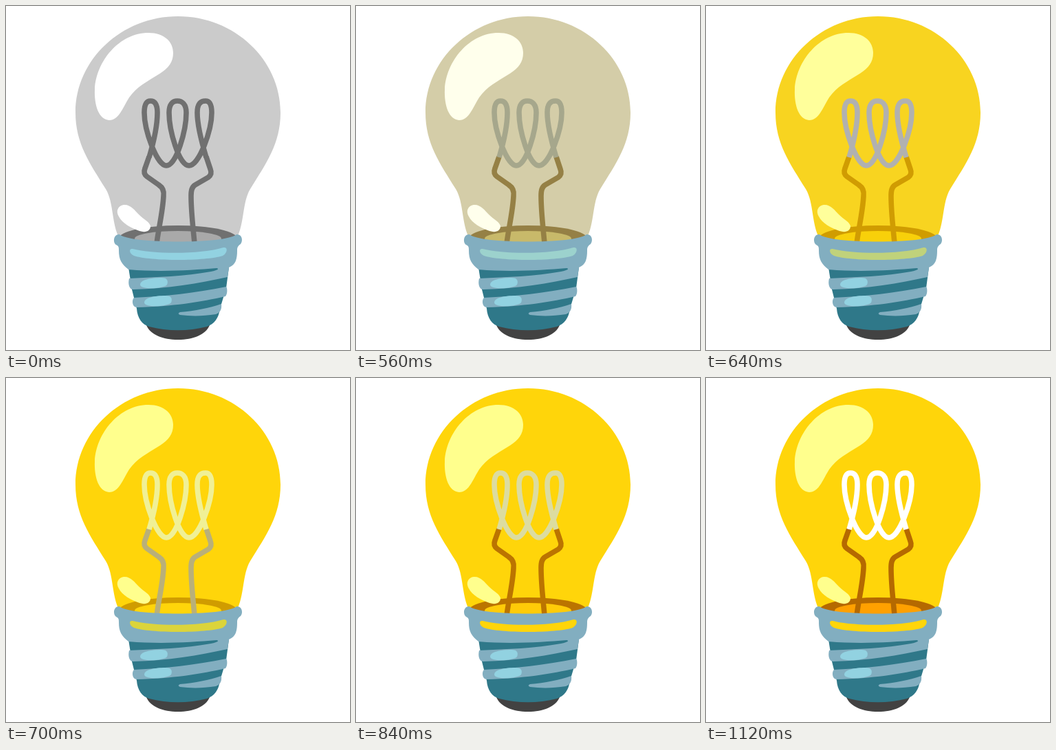
An HTML page for the animation above (2.88 s loop, 500 px wide and 500 px high).

```html
<!DOCTYPE html>
<html lang="en">
<head>
<meta charset="utf-8">
<title>Light bulb</title>
<style>
  html, body { margin: 0; width: 100%; height: 100%; overflow: hidden; background: #fff; }
  svg { display: block; width: 100%; height: 100%; }
  .wire { fill: none; stroke-width: 7.6; stroke-linejoin: round; }
</style>
</head>
<body>
<svg viewBox="0 0 500 500">
  <path id="glass" d="M250 15C168 15 101 78 101 155C101 200 122 229 145 266C157 286 153 316 165 338H335C347 316 343 286 355 266C378 229 399 200 399 155C399 78 332 15 250 15Z"/>
  <ellipse id="ring" cx="250" cy="338" rx="86" ry="19"/>
  <ellipse id="floor" cx="250" cy="338" rx="63" ry="11"/>
  <g id="stems" class="wire">
    <path d="M208 219L202 236C200 241 201 245 205 248L222 260C228 264 230 269 229 276C228 298 222 322 219 345"/>
    <path d="M291 219L297 237C299 242 298 246 294 249L275 260C270 263 269 268 269 276C269 300 272 322 274 345"/>
  </g>
  <path id="coil" class="wire" d="M208 220C214 200 220 175 220 155C220 143 216 138 210 138C204 138 201 144 201 155C201 180 219 232 233 232C248 232 262 180 262 155C262 143 256 138 249 138C242 138 237 143 237 155C237 180 251 232 266 232C281 232 299 180 299 155C299 143 296 138 290 138C282 138 278 143 278 155C278 175 285 200 291 220"/>
  <g id="shine">
    <path d="M150 166C135 165 128 145 129 121C131 80 165 39 207 39C230 39 243 52 243 68C243 82 236 90 224 98C205 110 190 117 179 133C169 149 164 166 150 166Z"/>
    <path d="M171 289C163 290 159 298 164 306C168 315 182 323 194 327C203 330 210 327 210 320C209 314 201 311 193 303C187 297 181 288 171 289Z"/>
  </g>
  <path fill="#424242" d="M204 464C210 478 228 485 250 485S290 478 296 464Z"/>
  <path fill="#2f7889" d="M178 380L183 412L187 428L190 440C191 454 198 463 208 466C235 473 265 473 292 466C303 462 309 454 311 440L320 410L324 380Z"/>
  <g fill="#82aec0">
    <path d="M165 332C156 331 155 344 160 347C164 349 164 351 164 355C164 369 168 375 178 383C225 387 270 384 306 381C312 382 304 385 298 386C260 393 220 394 179 396C177 404 179 412 185 412C235 411 280 403 322 394L324 380C334 376 336 368 336 355C336 350 338 348 341 346C345 341 343 331 335 332C320 346 180 346 165 332Z"/>
    <path d="M186 424C182 428 184 438 190 438C240 437 285 430 319 422C322 419 322 410 320 408C275 417 232 422 186 424Z"/>
    <path d="M253 445C275 443 295 439 313 433C314 441 311 446 305 448C286 451 269 451 253 449C250 448 250 446 253 445Z"/>
  </g>
  <path id="glint" d="M184 353C215 361 285 361 316 351C323 350 322 359 315 363C290 371 210 371 186 363C179 360 178 352 184 353Z"/>
  <g fill="#92d2e1">
    <path d="M195 405C195 398 210 395 226 395C235 395 236 400 234 405C230 411 195 413 195 405Z"/>
    <path d="M201 431C201 424 216 421 232 421C241 421 242 426 240 431C236 437 201 439 201 431Z"/>
  </g>
</svg>
<script>
const LOOP = 2880;

// Each track lists [time in ms, colour]
const tracks = {
  glass: [[540, 'cbcbcb'], [600, 'e4d066'], [640, 'f8d421'], [670, 'ffd50a']],
  shine: [[540, 'ffffff'], [600, 'ffffc8'], [640, 'ffff9b'], [670, 'ffff8d']],
  ring: [[520, '707070'], [600, 'b8901c'], [640, 'd09c00'], [700, 'd09c00'], [840, 'bb7400'], [1120, 'b56900']],
  floor: [[520, 'a9a9a9'], [600, 'e5c92f'], [640, 'f8d00a'], [700, 'ffd50a'], [840, 'ffcb08'], [1120, 'ffa000']],
  stems: [[520, '707070'], [600, 'b8901c'], [640, 'd09c00'], [700, 'b9b07a'], [840, 'bb7400'], [1120, 'b56900']],
  coil: [[520, '707070'], [600, 'd9dba6'], [640, 'b0b0b0'], [700, 'f0f096'], [840, 'dcdca0'], [1120, 'ffffff']],
  glint: [[530, '92d2e1'], [600, 'a8d1b3'], [640, 'c0d27c'], [700, 'dbd43c'], [780, 'ffd50a']]
};

const rgb = hex => [0, 2, 4].map(i => parseInt(hex.slice(i, i + 2), 16));

function colourAt(track, t) {
  const next = track.findIndex(([time]) => time > t);
  if (next === 0) return '#' + track[0][1];
  if (next < 0) return '#' + track[track.length - 1][1];
  const [t0, from] = track[next - 1], [t1, to] = track[next];
  const k = (t - t0) / (t1 - t0), end = rgb(to);
  return `rgb(${rgb(from).map((c, i) => Math.round(c + (end[i] - c) * k))})`;
}

function draw(now) {
  const t = now % LOOP;
  for (const id in tracks) {
    const el = document.getElementById(id);
    const prop = el.classList.contains('wire') ? 'stroke' : 'fill';
    el.setAttribute(prop, colourAt(tracks[id], t));
  }
}

const start = performance.now();
function tick() {
  draw(performance.now() - start);
  requestAnimationFrame(tick);
}
tick();
</script>
</body>
</html>
```
